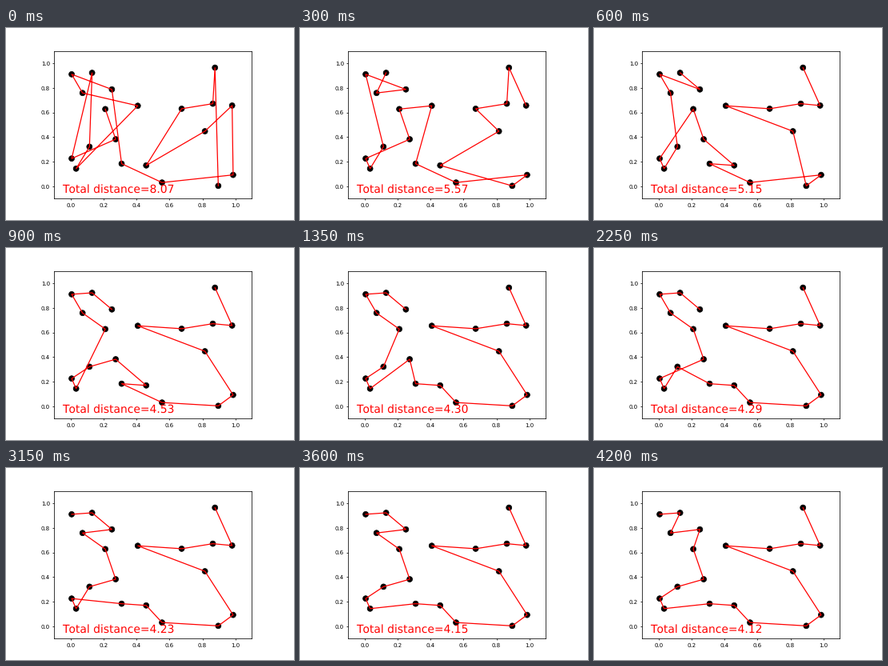
Animation, 360 px wide and 240 px high, one loop 4.35 s. Source, as a matplotlib script:

```python
import matplotlib.pyplot as plt
from matplotlib.animation import FuncAnimation

WIDTH, HEIGHT, DPI = 360, 240, 50
STEP_MS = 150
LEFT, RIGHT, TOP, BOTTOM = 60, 307.4, 28.8, 213.3

CITIES = {
    "A": (0.007, 0.911), "B": (0.131, 0.923), "C": (0.073, 0.759), "D": (0.251, 0.788),
    "E": (0.211, 0.628), "F": (0.408, 0.655), "G": (0.274, 0.383), "H": (0.115, 0.322),
    "I": (0.007, 0.226), "J": (0.034, 0.144), "K": (0.310, 0.184), "L": (0.459, 0.170),
    "M": (0.555, 0.031), "N": (0.896, 0.004), "O": (0.986, 0.093), "P": (0.815, 0.448),
    "Q": (0.674, 0.631), "R": (0.863, 0.672), "S": (0.980, 0.657), "T": (0.876, 0.965),
}

# Recurring tours of the settled population, named by their length.
TAIL = "KLMNOPFQRST"
T430 = ("DBACEHIJG" + TAIL, 4.30)
T429 = ("DBACEGIJH" + TAIL, 4.29)
T414 = ("DBACEGHIJ" + TAIL, 4.14)

# Best tour of each generation: (steps held, (visiting order, length)).
HISTORY = [
    (1, ("EGIBHJFCADKMOSPLQRTN", 8.07)),
    (1, ("BGIEHJFCADKMOSPLQRTN", 7.84)),
    (1, ("BCDAHJIGEFKMONLPQRTS", 5.57)),
    (1, ("BCDAHJIEGLKMONPFQRST", 5.32)),
    (1, ("BDACHJIEGLKMONPFQRST", 5.15)),
    (1, ("BDACEJIHGLKMNOPFQRTS", 4.85)),
    (1, ("DBACEJIHGLKMNOPFQRST", 4.53)),
    (2, ("DBACEJIHG" + TAIL, 4.33)),
    (4, T430),
    (1, T429),
    (1, T430),
    (4, T429),
    (1, ("DBACEGJIH" + TAIL, 4.27)),
    (1, T414),
    (2, ("ABDCEGHJI" + TAIL, 4.23)),
    (1, T414),
    (1, ("ABDCEGHIJ" + TAIL, 4.15)),
    (3, T414),
    (1, ("ABCDEGHIJ" + TAIL, 4.12)),
]
TIMELINE = [tour for held, tour in HISTORY for _ in range(held)]

plt.rcParams.update({
    "axes.linewidth": 1.1,
    "xtick.major.width": 1.1,
    "ytick.major.width": 1.1,
    "text.hinting": "none",
    "text.kerning_factor": 6,
})
fig = plt.figure(figsize=(WIDTH / DPI, HEIGHT / DPI), dpi=DPI, facecolor="white")
ax = fig.add_axes([LEFT / WIDTH, 1 - BOTTOM / HEIGHT,
                   (RIGHT - LEFT) / WIDTH, (BOTTOM - TOP) / HEIGHT])
ax.set_xlim(-0.1, 1.1)
ax.set_ylim(-0.1, 1.1)

# One size per city keeps the dots from being rounded to whole pixels.
ax.scatter(*zip(*CITIES.values()), s=[100] * len(CITIES), c="k")
route, = ax.plot([], [], "r-", linewidth=1.8)
label = ax.text(-0.05, -0.05, "", size=20, color="red")


def update(step):
    order, length = TIMELINE[step]
    route.set_data(*zip(*(CITIES[city] for city in order)))
    label.set_text(f"Total distance={length:.2f}")
    return route, label


anim = FuncAnimation(fig, update, frames=len(TIMELINE), interval=STEP_MS,
                     repeat=True, repeat_delay=0)
plt.show()
```
